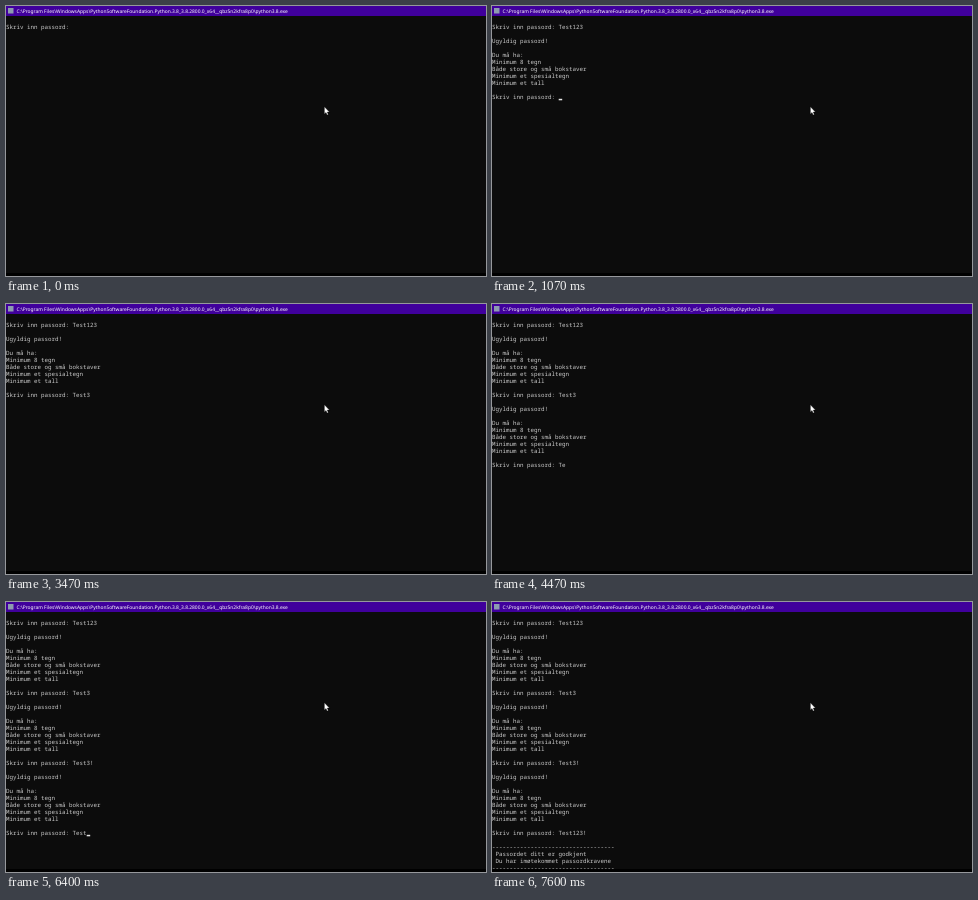
Write an HTML page that moves like this. It is 480 px wide and 270 px high and loops after 8000 ms.

```html
<!DOCTYPE html>
<html lang="no">
<head>
<meta charset="utf-8">
<title>Passord</title>
<style>
  html, body { margin: 0; width: 100%; height: 100%; overflow: hidden; background: #0c0c0c; }
  svg { display: block; width: 480px; height: 270px; }
  text { white-space: pre; text-rendering: geometricPrecision; }
  .title { font: 500 4.9px "Noto Sans", sans-serif; fill: #fff; }
  #console { font: 5.833px "Noto Sans Mono", monospace; fill: #ccc; }
</style>
</head>
<body>
<svg viewBox="0 0 480 270">
  <rect width="480" height="270" fill="#0c0c0c"/>
  <rect y="267" width="480" height="3" fill="#000"/>
  <rect width="480" height="10" fill="#40009c"/>
  <rect x="2" y="2" width="5.5" height="5.5" fill="#8d9bb0"/>
  <text class="title" x="10.5" y="6.9">C:\Program Files\WindowsApps\PythonSoftwareFoundation.Python.3.8_3.8.2800.0_x64__qbz5n2kfra8p0\python3.8.exe</text>
  <g id="console"></g>
  <rect id="caret" width="3.5" height="1.5" fill="#e6e6e6"/>
  <path d="M318.4 100.8v7.2l1.6-1.5 1.1 2.6 1.2-.5-1.1-2.5h2.2z" fill="#fff" stroke="#000" stroke-width=".3"/>
</svg>
<script>
const LOOP = 8000, CELL = 3.5, ROW = 7, BASE = 23, ROWS = 36;
const PROMPT = 'Skriv inn passord: ';
const RULES = ['', '', 'Ugyldig passord!', '', 'Du må ha:', 'Minimum 8 tegn',
  'Både store og små bokstaver', 'Minimum et spesialtegn', 'Minimum et tall', '', PROMPT].join('\n');
const RULE = '-'.repeat(35);
const DONE = ['', '', RULE, ' Passordet ditt er godkjent', ' Du har imøtekommet passordkravene', RULE].join('\n');

// [time in ms, text printed, caret visible]
const steps = [
  [0, PROMPT, 0],
  [70, 'T', 0], [130, '', 1], [270, 'e', 0], [330, 's', 0], [400, 't', 0], [470, '', 1],
  [670, '1', 0], [800, '2', 0], [870, '3', 0], [930, '', 1],
  [1070, RULES, 1], [1130, '', 0], [1870, '', 1],
  [2270, 'T', 0], [2400, 'e', 0], [2470, 's', 0], [2600, 't', 0], [2670, '', 1], [2930, '', 0],
  [3270, '3', 0], [3330, '', 1], [3470, '', 0],
  [3600, RULES, 0], [3670, '', 1],
  [3930, 'T', 0], [4470, 'e', 0], [4600, 's', 0], [4670, 't', 1], [5000, '3', 0],
  [5330, '', 1], [5400, '!', 1], [5530, '', 0],
  [5600, RULES, 0], [5670, '', 1],
  [6000, 'T', 0], [6070, 'e', 0], [6130, '', 1], [6330, 's', 0], [6400, 't', 1],
  [6600, '1', 0], [6670, '2', 1], [6930, '3', 1], [7130, '', 0], [7400, '!', 1],
  [7600, DONE, 0]
];

const screen = document.getElementById('console');
const caret = document.getElementById('caret');
const rows = Array.from({ length: ROWS }, (_, i) => {
  const row = document.createElementNS('http://www.w3.org/2000/svg', 'text');
  row.setAttribute('y', BASE + i * ROW);
  return screen.appendChild(row);
});

let shown = 0;
function render(time) {
  const past = steps.filter(([at]) => at <= time);
  if (past.length === shown) return;
  shown = past.length;
  const lines = past.map(step => step[1]).join('').split('\n');
  rows.forEach((row, i) => { row.textContent = lines[i] || ''; });
  const last = lines.length - 1;
  caret.setAttribute('x', lines[last].length * CELL + 0.2);
  caret.setAttribute('y', BASE + last * ROW - 0.2);
  caret.setAttribute('visibility', past[shown - 1][2] ? 'visible' : 'hidden');
}

const start = performance.now();
function tick() {
  render((performance.now() - start) % LOOP);
  requestAnimationFrame(tick);
}
tick();
</script>
</body>
</html>
```
